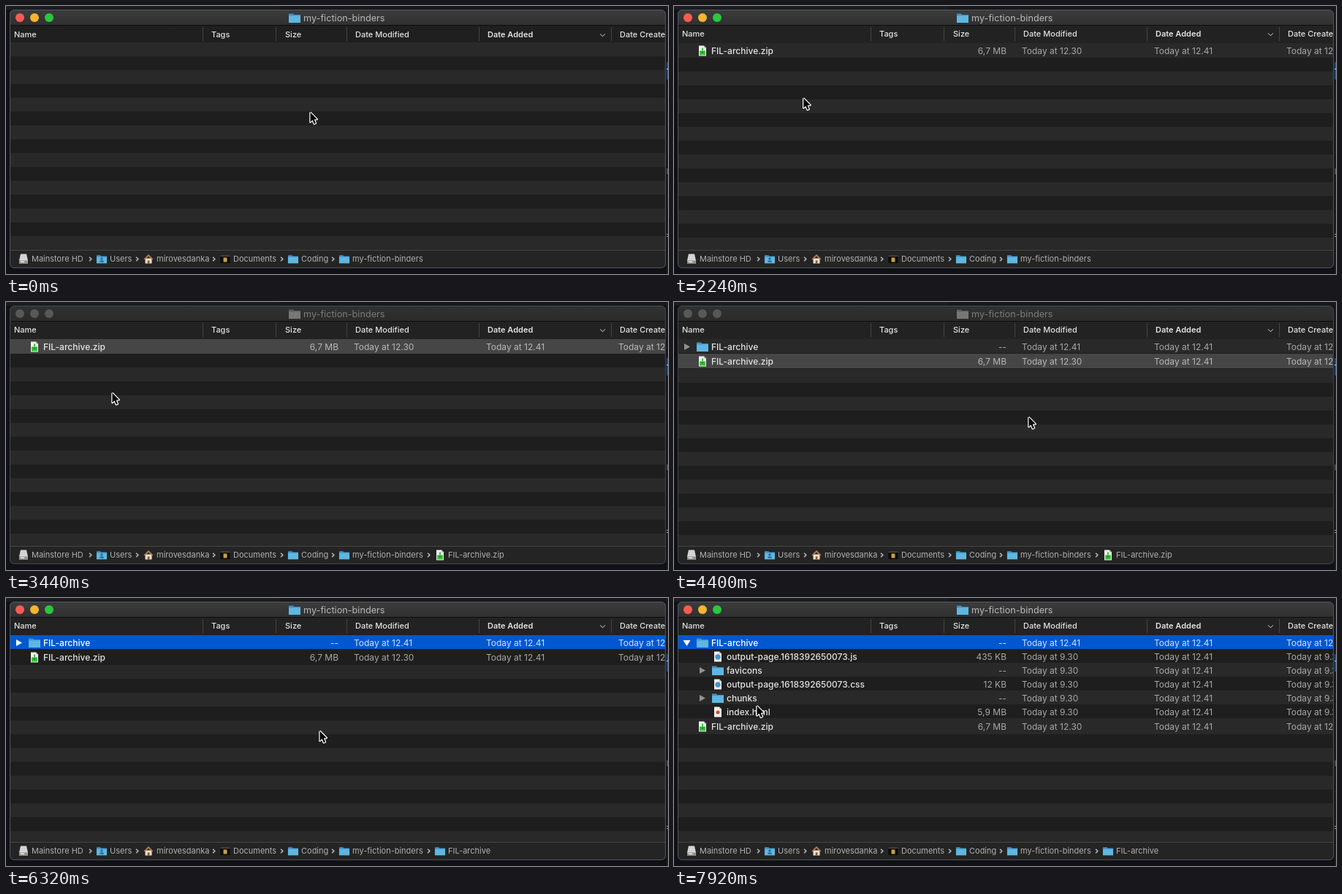
Recreate the animation shown at these times as an HTML page with a canvas. Size 906x368 px, loop 8000 ms.

```html
<!DOCTYPE html>
<html lang="en">
<head>
<meta charset="utf-8">
<title>File window</title>
<style>
  html, body { margin: 0; width: 100%; height: 100%; overflow: hidden; background: #101116; }
  canvas { display: block; }
</style>
</head>
<body>
<canvas width="906" height="368"></canvas>
<script>
const c = document.querySelector('canvas').getContext('2d');
const LOOP = 8000, ROW = 19;
const ROOT = 'my-fiction-binders', NAME = 'FIL-archive', ZIP = NAME + '.zip';
const BLUE = '#0058d0', GREY = '#464646', LIGHT = '#292929', DARK = '#1e1e1e';

// Moments at which the window changes state
const DROP = 560, PICK = 2800, BLUR = 3280, UNZIP = 3840, FOCUS = 4880, UP = 6080, OPEN = 6480;

// Pointer stops: time, x, y
const STOPS = [
  [0, 416, 145], [240, 416, 145], [1200, 295, 119], [1760, 295, 119], [2320, 170, 126],
  [2720, 133, 62], [3160, 133, 62], [3600, 150, 150], [4240, 485, 157], [4640, 485, 157],
  [5440, 446, 184], [6160, 446, 184], [6880, 313, 166], [7120, 313, 166], [7840, 113, 147], [8000, 113, 147]
];

function rect(x, y, w, h, color) {
  c.fillStyle = color;
  c.fillRect(x, y, w, h);
}

function disc(x, y, r, color) {
  c.fillStyle = color;
  c.beginPath();
  c.arc(x, y, r, 0, 7);
  c.fill();
}

function trace(x, y, points) {
  c.beginPath();
  for (let i = 0; i < points.length; i += 2) c.lineTo(x + points[i], y + points[i + 1]);
}

function poly(x, y, points, color) {
  trace(x, y, points);
  c.fillStyle = color;
  c.fill();
}

function stroke(x, y, points, color, width) {
  trace(x, y, points);
  c.strokeStyle = color;
  c.lineWidth = width;
  c.lineJoin = 'round';
  c.stroke();
}

function text(s, x, y, color, size = 12, weight = 400, align = 'left') {
  c.font = `${weight} ${size}px Inter, "Liberation Sans", sans-serif`;
  c.textAlign = align;
  c.fillStyle = color;
  c.fillText(s, x, y);
}

// Icons are drawn around their centre
function folder(x, y, scale = 1, front = '#5fb6e2', back = '#3f93c2') {
  c.save();
  c.translate(x, y);
  c.scale(scale, scale);
  poly(-8, -6.5, [0, 0.5, 6, 0.5, 7.5, 2, 16, 2, 16, 13, 0, 13], back);
  rect(-8, -3.2, 16, 9.7, front);
  c.restore();
}

function page(x, y) {
  poly(x - 5, y - 7, [0, 0, 7, 0, 10, 3, 10, 14, 0, 14], '#f0f0f0');
  poly(x + 2, y - 7, [0, 0, 3, 3, 0, 3], '#b5b5b5');
}

const icons = {
  folder,
  zip(x, y) {
    page(x, y);
    rect(x - 4, y, 8, 6, '#38c43c');
    rect(x - 1, y - 4, 2, 4, '#38c43c');
    poly(x, y + 1, [-2.5, 0, 2.5, 0, 0, 3], '#1f8f28');
  },
  web(x, y) { page(x, y); disc(x, y + 0.5, 3.7, '#4595c8'); },
  html(x, y) { page(x, y); disc(x, y + 0.5, 2.5, '#d4483b'); },
  disk(x, y) {
    poly(x - 6, y - 7, [2, 0, 10, 0, 12, 9, 12, 13, 0, 13, 0, 9], '#d4d4d4');
    rect(x - 6, y + 2, 12, 4, '#949494');
    rect(x - 4, y + 3, 5, 1.5, '#eee');
  },
  users(x, y) {
    folder(x, y, 0.88);
    disc(x, y - 0.5, 1.8, '#2b7099');
    rect(x - 2.5, y + 2, 5, 2.5, '#2b7099');
  },
  home(x, y) {
    rect(x - 4.5, y - 1, 9, 7, '#e9dfcc');
    poly(x, y, [-6.5, 0, 0, -6.5, 6.5, 0, 5, 1, 0, -4, -5, 1], '#b98355');
    rect(x - 1.2, y + 2, 2.6, 4, '#8a4f30');
  },
  docs(x, y) {
    rect(x - 6.5, y - 5, 13, 10.5, '#0b0b0b');
    rect(x - 6.5, y - 5, 13, 1.5, '#61512d');
    rect(x - 2.5, y - 2, 5, 6, '#c4a04b');
  },
  small(x, y) { folder(x, y, 0.88); }
};

function backdrop() {
  rect(0, 0, 906, 368, '#101116');
  rect(0, 0, 374, 5, '#1b1c22');
  rect(374, 0, 532, 5, '#17181d');
  rect(904, 0, 2, 368, '#1a1c22');
  rect(904, 77, 2, 24, '#0d4fa8');
  rect(904, 86, 2, 1, '#d0d0d0');
  rect(904, 223, 2, 8, '#4a4a4a');
  rect(904, 313, 2, 1, '#a0a0a0');
  rect(904, 316, 2, 1, '#a0a0a0');
}

function header(active, filled) {
  const shade = c.createLinearGradient(0, 6, 0, 26);
  shade.addColorStop(0, active ? '#3c3c3d' : '#313131');
  shade.addColorStop(1, active ? '#303031' : '#2b2b2b');
  rect(5, 6, 898, 20, shade);
  rect(5, 26, 898, 1, '#0e0e0e');
  rect(5, 27, 898, filled ? 24 : 23, filled ? '#222' : '#1f1f1f');
  ['#ff5b52', '#f6b52e', '#29c83f'].forEach((color, i) => disc(19 + 20 * i, 16, 6, active ? color : '#585858'));
  if (active) folder(395, 16.5);
  else folder(395, 16.5, 1, '#777', '#606060');
  text(ROOT, 407, 20.5, active ? '#b9b9b9' : '#7b7b7b', 12.7);

  const y = filled ? 42 : 43;
  [['Name', 11], ['Tags', 281], ['Size', 382], ['Date Modified', 478], ['Date Added', 659], ['Date Created', 840]]
    .forEach(([label, x]) => text(label, x, y, '#e2e2e2', 11, label == 'Date Added' ? 600 : 500));
  for (const x of [269, 369, 466, 647, 828]) rect(x, 29, 1, 19, '#444');
  stroke(816.5, y - 3, [-3.5, -1.7, 0, 1.7, 3.5, -1.7], '#9a9a9a', 1.1);
}

function listing(t) {
  const list = [];
  const add = (icon, name, size, depth, date, twist) => list.push({ icon, name, size, depth, date, twist });
  if (t >= UNZIP) add('folder', NAME, '--', 0, '12.41', t >= OPEN ? 'down' : 'right');
  if (t >= OPEN) {
    add('web', 'output-page.1618392650073.js', '435 KB', 1, '9.30');
    add('folder', 'favicons', '--', 1, '9.30', 'right');
    add('web', 'output-page.1618392650073.css', '12 KB', 1, '9.30');
    add('folder', 'chunks', '--', 1, '9.30', 'right');
    add('html', 'index.html', '5,9 MB', 1, '9.30');
  }
  if (t >= DROP) add('zip', ZIP, '6,7 MB', 0, '12.30');
  return list;
}

function rows(t, active) {
  const list = listing(t), count = list.length, top = count ? 51 : 50;
  const chosen = t >= UP ? NAME : t >= PICK ? ZIP : '';
  const gap = count > 1 ? 3 : count;
  for (let i = 0; i < 16; i++)
    rect(5, top + i * ROW + (i >= count ? gap : 0), 898, ROW + gap, i % 2 ? DARK : LIGHT);

  list.forEach((f, i) => {
    // The last row sits a little lower and is one pixel taller
    const last = i == count - 1;
    const y = top + i * ROW + (last && i ? 1 : 0), mid = y + 10.5, base = y + 15;
    const on = f.name == chosen, lit = on && active;
    if (on) rect(5, y, 898, last ? ROW + 1 : ROW, active ? BLUE : GREY);
    const ink = lit ? '#d0e1f8' : on ? '#b8b8b8' : '#a8a8a8', dx = f.depth * 21;
    if (f.twist) {
      const tri = f.twist == 'down' ? [-5, -3.5, 5, -3.5, 0, 4.5] : [-3.5, -4.5, 4.5, 0, -3.5, 4.5];
      poly(17.5 + dx, mid, tri, lit ? '#fff' : '#929292');
    }
    icons[f.icon](39 + dx, mid);
    text(f.name, 51 + dx, base, lit ? '#fff' : '#e4e4e4', 12, 500);
    text(f.size, 455, base, ink, 12, 400, 'right');
    text('Today at ' + f.date, 476, base, ink);
    text('Today at 12.41', 657, base, ink);
    text('Today at ' + (f.depth ? '9.30' : '12.41'), 838, base, ink);
  });
}

function pathBar(t) {
  rect(5, 335, 898, 25, '#242424');
  rect(5, 335, 898, 1, '#454545');
  const path = [['disk', 'Mainstore HD', 24], ['users', 'Users', 131], ['home', 'mirovesdanka', 195],
    ['docs', 'Documents', 300], ['small', 'Coding', 393], ['small', ROOT, 463]];
  if (t >= UP) path.push(['small', NAME, 594]);
  else if (t >= PICK) path.push(['zip', ZIP, 594]);
  path.forEach(([icon, label, x], i) => {
    icons[icon](x, 347.5);
    text(label, x + 11, 351, '#b0b0b0', 11);
    if (i) stroke(x - 15.5, 347.5, [-1.5, -2.8, 1.5, 0, -1.5, 2.8], '#c4c4c4', 1.3);
  });
}

function pointer(t) {
  const i = STOPS.findIndex(s => s[0] > t);
  const [t0, x0, y0] = STOPS[i - 1], [t1, x1, y1] = STOPS[i];
  const u = (t - t0) / (t1 - t0), k = u * u * (3 - 2 * u);
  const x = x0 + (x1 - x0) * k, y = y0 + (y1 - y0) * k;
  const arrow = [0.5, 1, 0.5, 14.5, 3.5, 11.6, 5.8, 17, 8, 16, 5.8, 10.8, 9.8, 10.5, 0.5, 1];
  stroke(x, y, arrow, '#fff', 2.4);
  poly(x, y, arrow, '#050505');
}

function draw(t) {
  const active = t < BLUR || t >= FOCUS;
  backdrop();
  c.save();
  c.beginPath();
  c.roundRect(5, 5, 898, 355, 6);
  c.clip();
  rows(t, active);
  header(active, t >= DROP);
  pathBar(t);
  c.restore();
  c.strokeStyle = active ? '#555659' : '#44474c';
  c.lineWidth = 1;
  c.beginPath();
  c.roundRect(5.5, 5.5, 897, 354, 5.5);
  c.stroke();
  pointer(t);
}

function tick() {
  draw(performance.now() % LOOP);
  requestAnimationFrame(tick);
}
tick();
</script>
</body>
</html>
```
